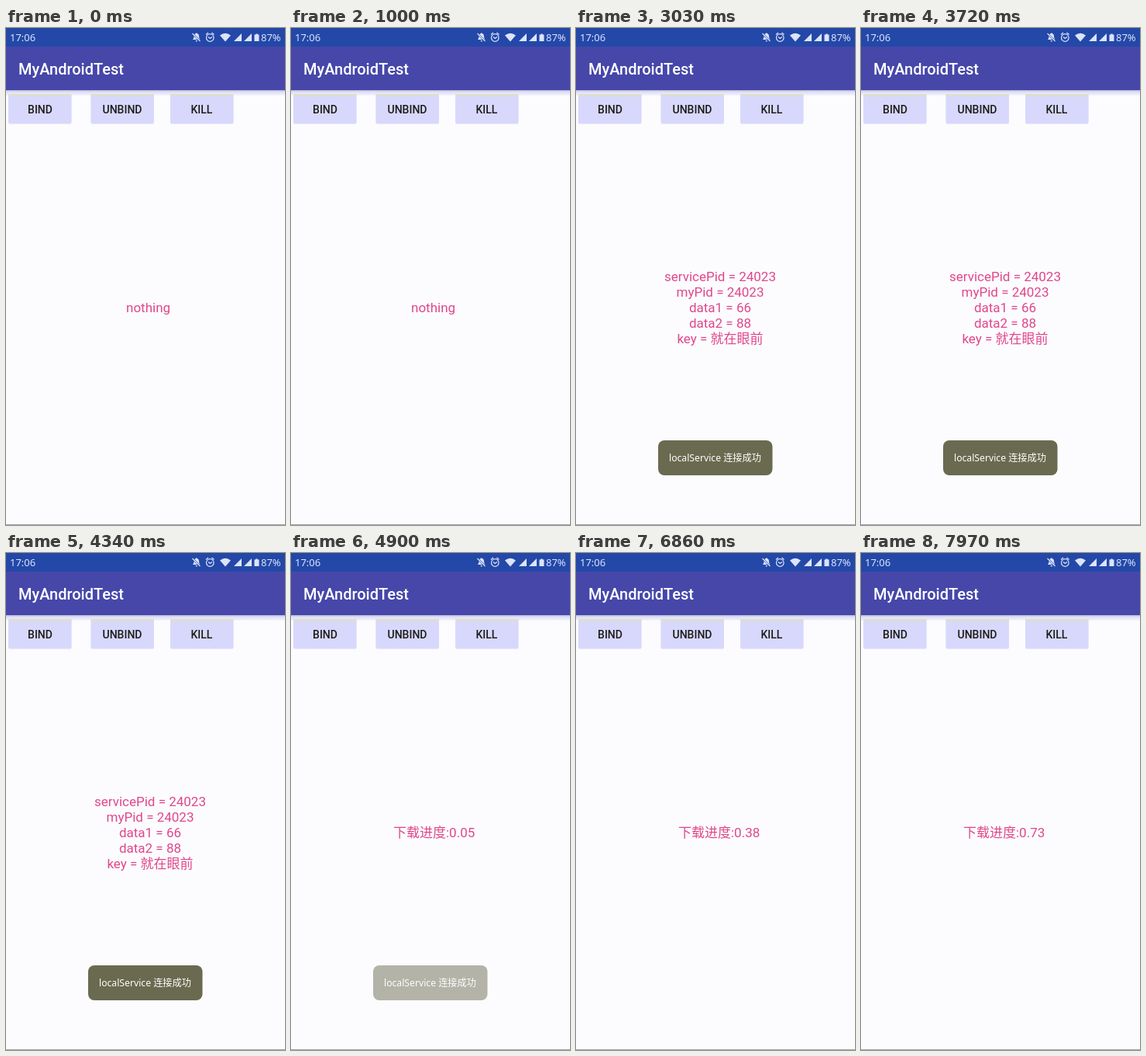
These frames come from a looping animation (360x640 px, 8000 ms). An HTML page:

```html
<!DOCTYPE html>
<html lang="en">
<head>
<meta charset="utf-8">
<title>Service binding demo</title>
<style>
  html, body { margin: 0; width: 100%; height: 100%; overflow: hidden; background: #fcfcff; }
  svg { display: block; width: 360px; height: 640px; }
  text { font-family: Roboto, "Noto Sans CJK SC", "Noto Sans CJK", sans-serif; }
  .status { font: 13px "Noto Sans", sans-serif; fill: #dce4fa; }
  .title { font-size: 20px; font-weight: 500; fill: #fff; }
  .label { font-size: 14px; font-weight: 500; fill: #1c1c18; text-anchor: middle; }
  .body { font-size: 17px; fill: #e0468c; }
  .toast { font: 12.2px "Noto Sans", "Noto Sans CJK SC", "Noto Sans CJK", sans-serif; fill: #fff; }
</style>
</head>
<body>
<svg viewBox="0 0 360 640">
  <defs>
    <linearGradient id="shade" x2="0" y2="1">
      <stop offset="0" stop-color="#b9b9d4"/>
      <stop offset=".35" stop-color="#dedef6"/>
      <stop offset="1" stop-color="#f4f4ff"/>
    </linearGradient>
    <clipPath id="bindClip"><rect x="3" y="85" width="82" height="38" rx="2"/></clipPath>
  </defs>

  <rect width="360" height="640" fill="#fcfcff"/>
  <rect y="639" width="360" height="1" fill="#a4a4a8"/>
  <rect y="80" width="360" height="7" fill="url(#shade)"/>
  <rect width="360" height="24" fill="#2448a8"/>
  <rect y="24" width="360" height="56" fill="#4647a9"/>

  <text class="status" x="5" y="17">17:06</text>
  <text class="status" x="329" y="17">87%</text>
  <g fill="#dce4fa">
    <path d="M241 15q1.5-1.5 1.5-4.5 0-3 2.5-3.5V6.5h1.500V7q2.500.500 2.500 3.500 0 3 1.500 4.500zM244.500 16h2.500q-.300 1.500-1.200 1.500t-1.300-1.500z"/>
    <path d="M241 7.500l9.500 9.500" stroke="#2448a8" stroke-width="2.400"/>
    <path d="M240.500 7l10 10M258 8.500l3-2.500M268.500 8.500l-3-2.500" stroke="#dce4fa" stroke-width="1.200"/>
    <g fill="none" stroke="#dce4fa" stroke-width="1.200">
      <circle cx="263.300" cy="12.500" r="4.800"/>
      <path d="M261 11.500l2.300 2 2.700-2"/>
    </g>
    <path d="M276 9.500q7-5.500 14 0l-7 8z"/>
    <path d="M294 17l10-10v10zM307 17l10-10v10z"/>
    <path d="M320.500 8.500h1.800V7.500h2.400v1h1.800V17h-6z"/>
  </g>

  <text class="title" x="16" y="60">MyAndroidTest</text>

  <g id="buttons"></g>
  <g clip-path="url(#bindClip)"><circle id="ripple" cx="37" cy="106" fill="#dbdbae"/></g>
  <circle id="touch" cx="37.500" cy="106.500" r="11" fill="#e4e4c4" fill-opacity=".5" stroke="#bcbca4"/>
  <g id="labels"></g>

  <text id="idle" class="body" x="155" y="366">nothing</text>
  <g id="details" class="body" text-anchor="middle"></g>
  <text id="progress" class="body" x="132" y="366"></text>

  <g id="toast">
    <rect x="106" y="531" width="147.500" height="45" rx="8" fill="#6a6a50"/>
    <text class="toast" x="120" y="558">localService 连接成功</text>
  </g>
</svg>
<script>
const LOOP = 8000;
const PRESS = 2330, BOUND = 2460, DOWNLOAD = 4440;
const $ = id => document.getElementById(id);

function add(parent, tag, attrs, text = "") {
  const node = document.createElementNS("http://www.w3.org/2000/svg", tag);
  for (const key in attrs) node.setAttribute(key, attrs[key]);
  node.textContent = text;
  parent.append(node);
}

["BIND", "UNBIND", "KILL"].forEach((name, i) => {
  const x = [3, 109.5, 212][i];
  const box = { x, width: 81.5, rx: 2 };
  add($("buttons"), "rect", { ...box, y: 86, height: 38, fill: "#ececf8" });
  add($("buttons"), "rect", { ...box, y: 85, height: 38, fill: "#d8d8fd" });
  add($("buttons"), "rect", { x, width: 81.5, y: 85, height: 3, fill: "#dedfcf" });
  add($("labels"), "text", { class: "label", x: [44, 150, 252.5][i], y: 109.5 }, name);
});

["servicePid = 24023", "myPid = 24023", "data1 = 66", "data2 = 88", "key = 就在眼前"]
  .forEach((line, i) => add($("details"), "text", { x: 186, y: 326 + 20 * i }, line));

// [time, value] steps
const tables = {
  radius: [[PRESS, 6], [2480, 41], [2620, 60]],
  ripple: [[PRESS, 0], [2380, 1], [2520, 1], [2850, 0]],
  touch: [[PRESS - 10, 0], [PRESS, 1], [2500, 1], [2520, 0]],
  toast: [[2560, 0], [2860, 1], [4660, 1], [5140, 0]],
  rise: [[2560, 41], [2860, 0]],
  loaded: [[DOWNLOAD, 0], [4900, .05], [5860, .15], [6400, .25], [7100, .45], [7970, .73]]
};

function sample(table, t) {
  if (t <= table[0][0]) return table[0][1];
  for (let i = 1; i < table.length; i++) {
    const [t0, a] = table[i - 1], [t1, b] = table[i];
    if (t < t1) return a + (b - a) * (t - t0) / (t1 - t0);
  }
  return table[table.length - 1][1];
}

const show = (id, on) => $(id).style.display = on ? "" : "none";

function draw(t) {
  const at = name => sample(tables[name], t);
  $("ripple").setAttribute("r", at("radius"));
  $("ripple").style.opacity = at("ripple");
  $("touch").style.opacity = at("touch");
  $("toast").style.opacity = at("toast");
  $("toast").setAttribute("transform", `translate(0 ${at("rise")})`);
  show("idle", t < BOUND);
  show("details", t >= BOUND && t < DOWNLOAD);
  show("progress", t >= DOWNLOAD);
  const percent = Math.floor(at("loaded") * 100 + .01);
  $("progress").textContent = "下载进度:" + (percent / 100).toFixed(2);
}

const start = performance.now();
function tick() {
  draw((performance.now() - start) % LOOP);
  requestAnimationFrame(tick);
}
draw(0);
requestAnimationFrame(tick);
</script>
</body>
</html>
```
